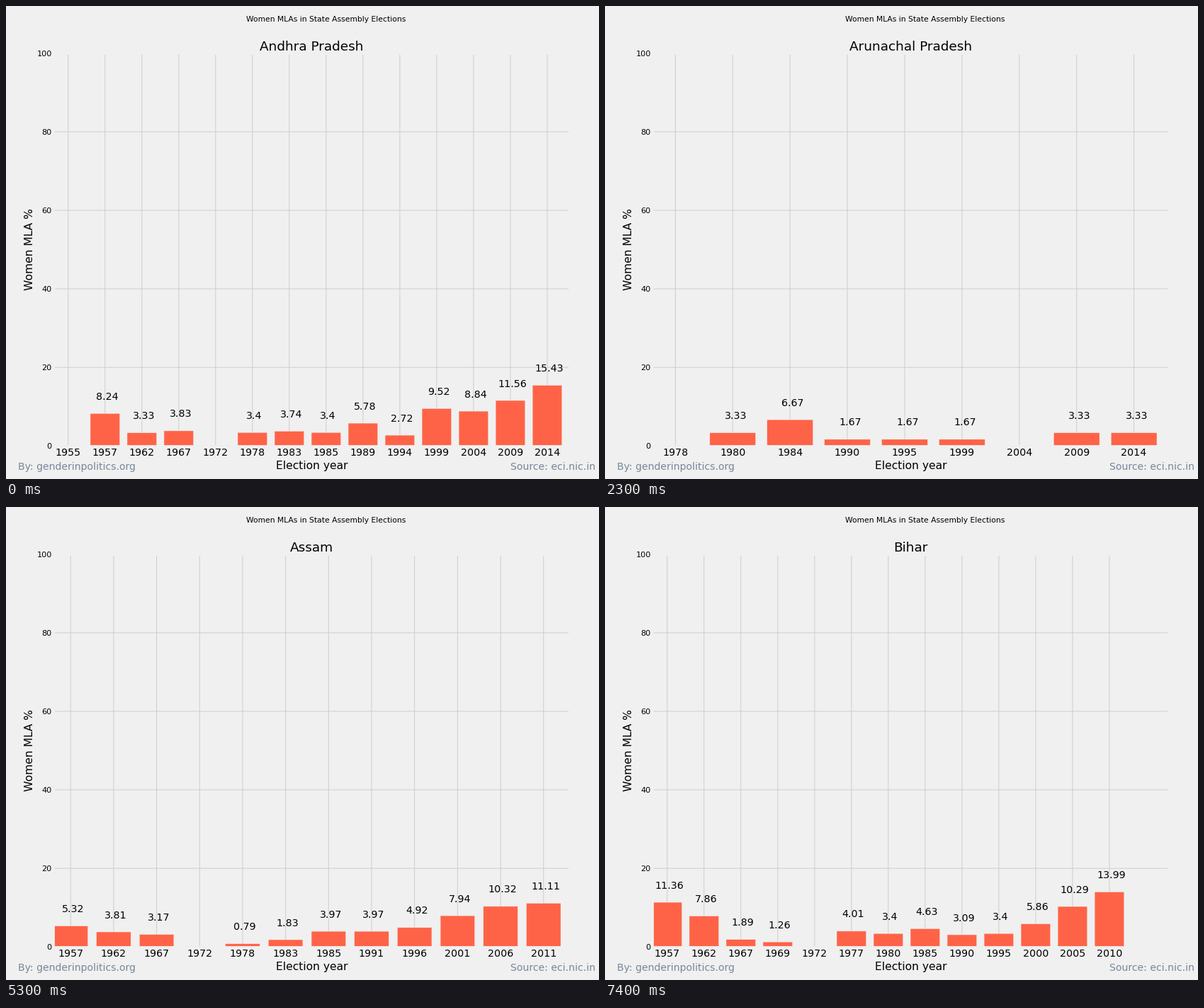
A matplotlib script that plays this animation: 837 px wide and 669 px high, repeating every 8000 ms.

```python
import math

import matplotlib.pyplot as plt
from matplotlib.animation import FuncAnimation

W, H, DPI = 837, 669, 96
STEP_MS, STEPS, HOLD = 500, 16, 6
PAPER, GRID, BAR, CREDIT = "#f0f0f0", "#cbcbcb", "tomato", "lightslategray"
LEFT, BOTTOM, WIDTH, HEIGHT = 0.08, 0.07, 0.87, 0.83
TERM, LAST_YEAR = 5, 2014

# state, years that restart the election cycle, women's share (0 = no bar)
CHARTS = [
    ("Andhra Pradesh", (1955, 1957, 1978, 1985, 1989),
     (0, 8.24, 3.33, 3.83, 0, 3.4, 3.74, 3.4, 5.78, 2.72,
      9.52, 8.84, 11.56, 15.43)),
    ("Arunachal Pradesh", (1978, 1980, 1984, 1990, 1999),
     (0, 3.33, 6.67, 1.67, 1.67, 1.67, 0, 3.33, 3.33)),
    ("Assam", (1957, 1978, 1985, 1991),
     (5.32, 3.81, 3.17, 0, 0.79, 1.83, 3.97, 3.97, 4.92,
      7.94, 10.32, 11.11)),
    ("Bihar", (1957, 1969, 1972, 1980),
     (11.36, 7.86, 1.89, 1.26, 0, 4.01, 3.4, 4.63, 3.09, 3.4,
      5.86, 10.29, 13.99)),
]

plt.rcParams["font.family"] = "DejaVu Sans"
fig = plt.figure(figsize=(W / DPI, H / DPI), dpi=DPI, facecolor=PAPER)
ax = fig.add_axes([LEFT, BOTTOM, WIDTH, HEIGHT])


def px(n):
    """Pixels to points."""
    return n * 72 / DPI


def label(x, y, text, size, **style):
    """Text with its baseline at stage pixel (x, y), counted from the top."""
    return fig.text(x / W, 1 - y / H, text, fontsize=px(size),
                    va="baseline", **style)


def election_years(starts):
    """A vote every full term, up to a year before the cycle restarts."""
    ends = [s - 1 for s in starts[1:]] + [LAST_YEAR + 1]
    return [year for start, end in zip(starts, ends)
            for year in range(start, max(end, start + 1), TERM)]


def axis_limit(count):
    """Round up to the next tick: single steps below ten, else twos."""
    tick = 1 if count < 10 else 2
    return math.ceil(count / tick) * tick


mid_x = (LEFT + WIDTH / 2) * W
mid_y = (1 - BOTTOM - HEIGHT / 2) * H
label(452, 22, "Women MLAs in State Assembly Elections", 10.8, ha="center")
title = label(mid_x + 0.3, 63, "", 18.45, ha="center")
label(mid_x + 0.3, 655, "Election year", 15.5, ha="center")
label(37.8, mid_y, "Women MLA %", 15.5, ha="center",
      rotation=90, rotation_mode="anchor")
label(0.02 * W + 0.4, 655.6, "By: genderinpolitics.org", 14, color=CREDIT)
label(0.85 * W + 0.2, 655.6, "Source: eci.nic.in", 14, color=CREDIT)
for tick in range(0, 101, 20):
    tick_y = (1 - BOTTOM - HEIGHT * tick / 100) * H
    label(64.6, tick_y + 3.9, str(tick), 11.2, ha="right")


def draw(step):
    name, starts, shares = CHARTS[(step + HOLD - 1) // HOLD]
    years = election_years(starts)
    centers = [i + 0.4 for i in range(len(years))]

    ax.cla()
    ax.set(xlim=(0, axis_limit(len(years))), ylim=(0, 100), facecolor=PAPER,
           xticks=centers, yticks=range(0, 101, 20))
    ax.tick_params(length=0, labelbottom=False, labelleft=False)
    ax.grid(color=GRID, linewidth=px(0.93), snap=False)
    ax.set_axisbelow(True)
    for spine in ax.spines.values():
        spine.set(color=PAPER, linewidth=px(2.8))

    title.set_text(name)
    ax.bar(centers, shares, 0.8, color=BAR, edgecolor="#eeeeee",
           linewidth=px(0.46), snap=False)
    for x, year, share in zip(centers, years, shares):
        ax.text(x, -2.5, str(year), ha="center", fontsize=px(14.3))
        if share:
            ax.text(x + 0.05, share + 3.5, str(share), ha="center",
                    fontsize=px(14.3))


anim = FuncAnimation(fig, draw, frames=STEPS, interval=STEP_MS,
                     repeat=True, repeat_delay=0)
plt.show()
```
